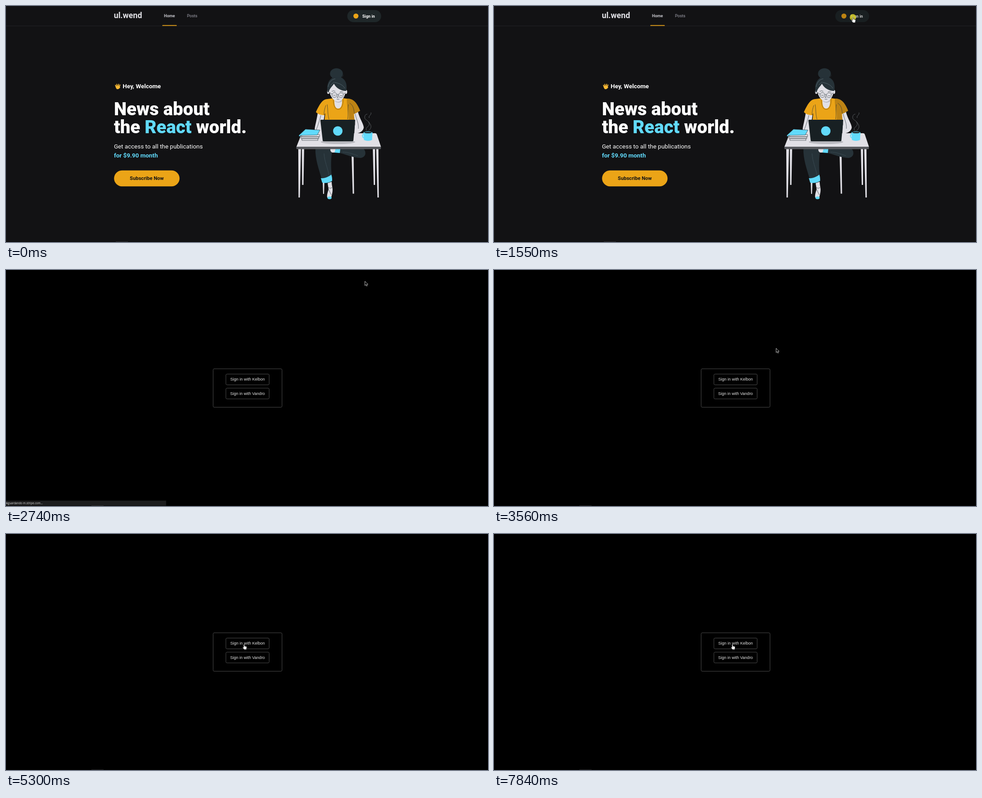
These frames come from a looping animation (1067x525 px, 8 s). An HTML page:

```html
<!DOCTYPE html>
<html lang="en">
<head>
<meta charset="utf-8">
<title>Sign in</title>
<style>
  html, body { margin: 0; width: 100%; height: 100%; overflow: hidden; background: #000; }
  svg { display: block; width: 1067px; height: 525px; }
  text { font: 9px Roboto, sans-serif; fill: #fff; }
  .bold { font-weight: 700; }
  .mid { font-size: 13.4px; }
  .title { font-size: 40px; font-weight: 900; }
  .cyan { fill: #61dafb; }
  .amber { fill: #eba417; }
  .dark { fill: #263238; }
  .light { fill: #e1e0e6; }
  .ink { fill: none; stroke: #263238; stroke-width: .7; }
  .panel rect { fill: #000; stroke: #4c4c4c; }
  .panel text { font: 9px "Liberation Sans", Arial, sans-serif; fill: #e6e6e6; text-anchor: middle; }
  #status text { font: 6.3px "Open Sans", sans-serif; fill: #dcdcdc; }
</style>
</head>
<body>
<svg viewBox="0 0 1067 525">
  <g id="home">
    <rect width="1067" height="525" fill="#121214"/>
    <path d="M0 44.300H1067" stroke="#29292d" stroke-width=".8"/>
    <text class="bold" x="238.700" y="27.300" style="font-size:17.8px;fill:#e1e1e6">ul.wend</text>
    <text class="bold" x="349.800" y="25.200" style="fill:#c8c8ce">Home</text>
    <text x="400.700" y="25.200" style="fill:#a8a8b3">Posts</text>
    <path class="amber" d="M346 44.300v-.7q0-1 1-1h30q1 0 1 1v.7z"/>

    <g id="signin">
      <rect x="755.500" y="9" width="75" height="27" rx="13.500" fill="#1f2729"/>
      <circle class="amber" cx="774.600" cy="22.300" r="5.600"/>
      <text class="bold" x="788.800" y="25.600">Sign in</text>
    </g>

    <!-- greeting hand -->
    <path d="M241.300 176l1.400-1 2.500 3.500-.9-5 1.500-.4 1.700 5 1.300-5 1.600.2-.3 5 2.200-3.800 1.200.8-1.700 4.500 1.300 1-2.300 2.700-2.500 1.500h-3l-2-3z" fill="#f9b934"/>
    <text class="bold mid" x="258.300" y="183">Hey, Welcome</text>
    <text class="title" x="238.900" y="243">News about</text>
    <text class="title" x="238.900" y="283">the <tspan class="cyan">React</tspan> world.</text>
    <text class="mid" x="238.900" y="317.400">Get access to all the publications</text>
    <text class="bold mid cyan" x="238.900" y="337.400">for $9.90 month</text>
    <rect class="amber" x="239.200" y="365.700" width="145" height="35.600" rx="17.800"/>
    <text class="bold" x="274.100" y="387.400" style="font-size:11.11px;fill:#121214">Subscribe Now</text>

    <g id="woman">
      <!-- back legs and body below the table -->
      <path class="light" d="M765 330h4.500l1 87.500h-3zM701 388h4l-1 30h-2z"/>
      <path class="light" d="M712 394l9-3c0 8 2 12 2 18s-2 12-3 17h-9c-1-7 2-13 3-19z"/>
      <path class="ink" d="M713 404q5 3 9 0M714 408l6 12"/>
      <ellipse class="cyan" cx="716.200" cy="426.800" rx="4.600" ry="3"/>
      <path class="dark" d="M721 318h71c6 7 5 18-7 20-19-1-33-8-46-11l-18-1z"/>
      <path class="dark" d="M685 318h38c-4 18-4 38-2 59l-22 8c-6-20-15-46-14-67z"/>
      <path d="M704 328c1 18 8 32 11 48M745 325c12 0 22 4 34 8" fill="none" stroke="#455a64" stroke-width=".6"/>
      <path class="light" d="M718 318h12l-2 8h-6q-5-3-4-8z"/>
      <path class="cyan" d="M730 318h10l-1 9-12-1z"/>
      <path class="cyan" d="M697 383c8 1 17-3 23-8 2 5 2 9 2 14-6 4-15 6-22 4z"/>
      <!-- torso and arms -->
      <path class="light" d="M690 238l15 5c-2 16-5 22-5 40h-12c-6-4-5-10-3-19s4-18 5-26z"/>
      <path class="light" d="M767 240l12-5c3 14 12 26 13 35-1 9-11 14-21 14l1-17c2-6-2-18-5-27z"/>
      <path class="ink" d="M697 243c-3 14-7 23-10 32M773 240c3 14 8 20 7 33"/>
      <path class="amber" d="M711 207l15-2h20l15 2c9 12 10 31 10 47h-66c2-14 2-20 0-11-7 0-14-2-19-7 7-15 14-29 25-29z"/>
      <path d="M755 206c15 0 22 10 29 27q-8 5-15 8l3 13h-14c4-18-6-33-3-48z" fill="#bd8314"/>
      <path class="ink" d="M704 242c0-9 2-15 4-21M711 219c2 15 1 22 4 33M758 219c-3 12 1 23-2 33M761 216c7 5 9 11 10 23"/>
      <path class="light" d="M727 202h17v9c0 11-3 17-9 17s-8-7-8-16z"/>
      <path d="M724.500 206c0 15 4 24 11 24s11-9 11-24" fill="none" stroke="#bd8314" stroke-width="2"/>
      <path d="M728 208q8 9 16 0v4q-8 6-16 0z" fill="#b9b9bf"/>
      <!-- head -->
      <ellipse class="light" cx="713.500" cy="191" rx="2.600" ry="4.600"/>
      <ellipse class="light" cx="752.700" cy="191" rx="2.600" ry="4.600"/>
      <path class="light" d="M715 178c0 15 3 24 12 32q8 7 16-1c8-7 10-19 9-33-8-12-29-12-37 2z"/>
      <ellipse class="dark" cx="731.500" cy="150.500" rx="14.200" ry="12"/>
      <path class="dark" d="M712 192c-4-21 6-34 20-35 17 0 25 14 21 32-11 0-22-6-27-16-4 6-10 11-12 19z"/>
      <path d="M713 180c2-11 8-17 16-18M727 170c7 1 18 4 23 13M719 176l7-7" fill="none" stroke="#71848c" stroke-width=".6"/>
      <path d="M722 161q8-4 18 0M744 159l3-6" class="ink"/>
      <g class="ink">
        <circle cx="727" cy="198" r="5.400"/><circle cx="741.500" cy="198.500" r="5.400"/>
        <path d="M732 197q2-1 4 0M715 192l7 4M752 193l-6 3M721 190q4-3 8 0M739 191q4-2 8 1M724 198q3 2 6 0M739 199q3 2 6 0M735 199l-2 5h3M732 207q4 2 6 0"/>
      </g>
      <!-- table -->
      <path class="light" d="M647 318h6l-2.500 108h-3zM655 318h5l-1.500 80h-3zM812 318h5v80h-3zM819.500 318h5l.8 108h-3z"/>
      <path class="light" d="M657 283h160q3 0 4 3l9 27H643l11-28q1-2 3-2z"/>
      <path d="M642.700 313h187.300v3.500q0 2-2 2H645q-2.300 0-2.300-2z" fill="#585a5f"/>
      <ellipse cx="735" cy="302.500" rx="38" ry="4.500" fill="#b8b8be"/>
      <path d="M697.500 253h74q2 0 1.500 2l-4 44q0 2-2 2h-64q-2 0-2-2l-5-44q0-2 1.500-2z" fill="#182023"/>
      <circle class="cyan" cx="734.500" cy="278" r="10.500"/>
      <!-- books -->
      <path class="ink" d="M655 286h39v5h-40zM653 291h40q-2 3 0 4h-40zM655 295h36q-2 3 0 4h-36z" style="fill:#e1e0e6"/>
      <path class="ink" d="M648 288l15-14 32 2-6 11-37 1-2 3z" style="fill:#61dafb"/>
      <!-- mug and steam -->
      <path d="M792 285c-4 0-4 7 1 9" fill="none" stroke="#61dafb" stroke-width="2"/>
      <path class="cyan" d="M791.300 281q10-5 20 0l-1 17q-9 4-18 0z"/>
      <ellipse class="dark" cx="801.300" cy="281.300" rx="8.500" ry="1.900"/>
      <path d="M798 277c-4-8 8-8 6-16s-11-7-10-14 4-5 6-7M803 277c9-8 4-14-1-20M804 249c-2-6 5-5 4-12" fill="none" stroke="#777d82" stroke-width=".7"/>
    </g>
  </g>

  <g id="login" class="panel">
    <rect width="1067" height="525" style="stroke:none"/>
    <rect x="458.500" y="219.800" width="152.500" height="85.500" rx="2.500"/>
    <rect id="first" x="486.800" y="231.500" width="95.700" height="24" rx="2.500"/>
    <rect x="486.800" y="262.800" width="95.700" height="24" rx="2.500"/>
    <text x="534.700" y="246.200">Sign in with Kelbon</text>
    <text x="534.700" y="277.500">Sign in with Vandro</text>
  </g>

  <rect y="524" width="1067" height="1" fill="#050505"/>
  <rect id="tab" y="524" width="27" height="1" fill="#2c2c2e"/>
  <g id="status">
    <rect y="513" width="354.500" height="11" fill="#1c1c1d"/>
    <text x="0" y="521.200">Aguardando m.stripe.com...</text>
  </g>

  <circle id="click" r="7" fill="#dcd322" opacity=".8"/>
  <g id="cursor">
    <path id="arrow" d="M0 0v9.500l2.200-2 1.500 3.300 1.600-.7-1.500-3.200h3z" fill="#000" stroke="#e8e8e8" stroke-width=".8"/>
    <path id="hand" d="M-1 1q1-1.500 2 0v3.500l4 .8q1 .3 1 1.500l-.7 3.200v2H0l-3-4.500q-.2-1.500 1-1L-1 7.500z" fill="#fff" stroke="#111" stroke-width=".6"/>
  </g>
</svg>
<script>
  const $ = id => document.getElementById(id);
  const show = (id, on) => $(id).style.display = on ? "" : "none";
  const ease = p => p * p * (3 - 2 * p);

  // Moves: start, end, steps, target x, target y
  const moves = [
    [460, 1220, 12, 795, 27],
    [1290, 1360, 2, 794.5, 25],
    [3080, 3840, 12, 522, 264],
    [3900, 3900, 1, 521, 265],
    [4160, 4490, 5, 525, 276],
    [5040, 5300, 5, 527, 245],
    [7840, 7840, 1, 527.8, 245]
  ];

  function pointer(t) {
    let x = 1012, y = 475;
    for (const [from, to, steps, tx, ty] of moves) {
      if (t < from) break;
      const gap = (to - from) / (steps - 1) || 1;
      const done = Math.min(steps, Math.floor((t - from) / gap + 1e-6) + 1);
      const p = from === 460 ? (done - 1) / (steps - 1) : done / steps;
      x += (tx - x) * ease(p);
      y += (ty - y) * ease(p);
    }
    return [x, y];
  }

  function draw(t) {
    const within = (a, b) => t >= a && t < b;
    const [x, y] = pointer(t);
    const login = t >= 2740;
    const hand = within(1220, 2050) || t >= 3900;

    show("home", !login);
    show("login", login);
    show("status", within(1840, 3480));
    show("cursor", t >= 460);
    show("arrow", !hand);
    show("hand", hand);
    show("click", within(1550, 1770) || within(6100, 6250));
    $("cursor").setAttribute("transform", `translate(${x} ${y})`);
    $("click").setAttribute("transform", `translate(${x} ${y})`);
    $("tab").setAttribute("x", t < 1840 ? 243 : 189);
    $("signin").style.filter = `brightness(${t < 1290 ? 1 : t < 1360 ? .9 : .8})`;
    $("first").style.fill = within(6100, 6320) ? "#181818" : "#000";
  }

  const start = performance.now();
  function tick() {
    draw((performance.now() - start) % 8000);
    requestAnimationFrame(tick);
  }
  tick();
</script>
</body>
</html>
```
